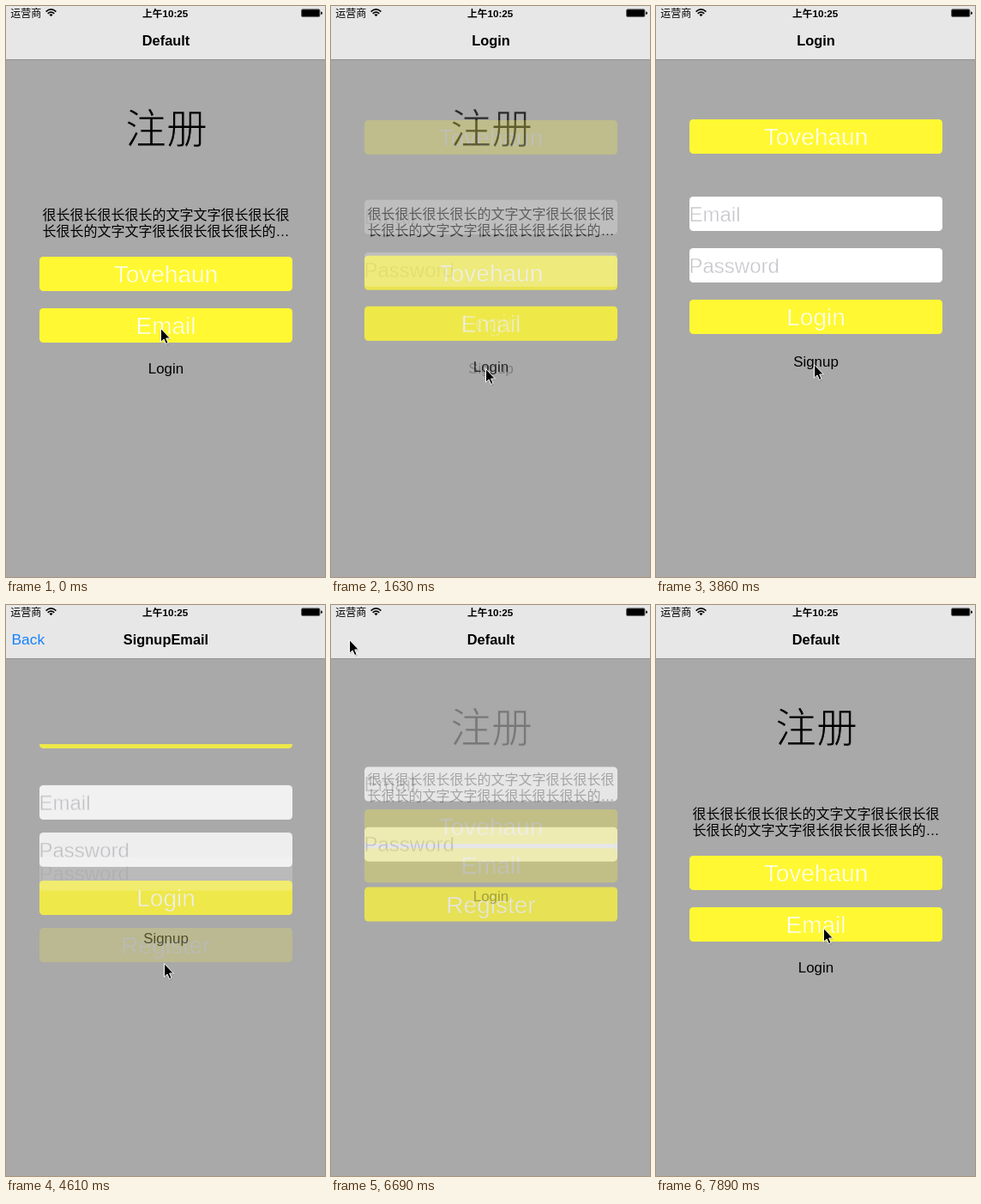
Recreate the animation shown at these times as an HTML page. Size 372 by 665 pixels, loop 8 s.

```html
<!DOCTYPE html>
<html lang="zh-CN">
<head>
<meta charset="utf-8">
<title>Login flow</title>
<style>
  html, body { margin: 0; width: 100%; height: 100%; overflow: hidden; background: #a9a9a9; }
  svg { display: block; width: 100%; height: 100%; }
  text { font-family: "Liberation Sans", "Noto Sans CJK SC", "Noto Sans CJK", sans-serif; }
  .mid { text-anchor: middle; }
  /* Background-coloured strokes thin the letters to a light weight. */
  .headline { font-size: 48px; font-weight: 300; stroke: #a9a9a9; stroke-width: 1.1; }
  .copy { font-size: 16px; font-weight: 300; }
  .link { font-size: 16.9px; }
  .caption { font-size: 28px; fill: #fff; stroke: #fff833; stroke-width: .6; }
  .hint { font-size: 24px; fill: #c7c7cc; stroke: #fff; stroke-width: .4; }
  .navTitle { font-size: 16.4px; font-weight: bold; }
  .back { font-size: 17.4px; fill: #1582fb; }
  .status { font-size: 11.7px; }
</style>
</head>
<body>
<svg viewBox="0 0 372 665" preserveAspectRatio="none">
  <defs>
    <clipPath id="below"><rect y="162" width="372" height="503"/></clipPath>
  </defs>
  <rect width="372" height="665" fill="#a9a9a9"/>
  <g id="stage"></g>
  <rect width="372" height="62" fill="#e7e7e7"/>
  <rect y="62" width="372" height="1" fill="#929292"/>

  <text class="status" x="5.3" y="12.5" style="font-size:12px">运营商</text>
  <g fill="none" stroke="#000" stroke-width="1.6">
    <path d="M46.6 6.6Q52.5 1.2 58.4 6.6M48.7 8.9Q52.5 5.5 56.3 8.9"/>
    <path d="M50.4 10L52.5 12.3L54.6 10Q52.5 8.4 50.4 10Z" fill="#000" stroke="none"/>
  </g>
  <text class="status mid" x="185.7" y="12.5" font-weight="bold">上午10:25</text>
  <rect x="344.5" y="3.8" width="21.5" height="8.8" rx="1.5" fill="#555" stroke="#333" stroke-width=".6"/>
  <rect x="345.2" y="4.5" width="20.1" height="7.4" rx=".6"/>
  <path d="M367.2 6.6Q369 6.8 369 8.3Q369 9.8 367.2 10Z"/>

  <text class="navTitle mid" id="navTitle" x="186.5" y="46"></text>
  <text class="back" id="back" x="6.5" y="46">Back</text>
  <g id="cursor">
    <path d="M1 2V17L5 14L7.5 20L10 19L7.6 13.4H12Z" opacity=".22"/>
    <path d="M.5 .6V16.2L4.1 13L6.6 18.6L9.1 17.5L6.7 12H11.4Z" stroke="#fff" stroke-width="1"/>
  </g>
</svg>
<script>
const $ = id => document.getElementById(id);
const LOOP = 8000, TICK = 148.87;

// Every part is drawn at its resting position; only shifts are animated.
const label = (cls, x, y, s) => `<text class="${cls}" x="${x}" y="${y}">${s}</text>`;
const box = (y, fill) => `<rect x="39" y="${y}" width="295" height="40" rx="4.5" fill="${fill}"/>`;
const button = (y, s) => box(y, '#fff833') + label('caption mid', 186.5, y + 30, s);
const field = (y, s) => box(y, '#fff') + label('hint', 38.5, y + 28.5, s);
const link = (y, s) => label('link mid', 186.5, y, s);

const pages = {
  Default: [
    label('headline mid', 187, 160, '注册'),
    label('copy', 42.5, 249, '很长很长很长很长的文字文字很长很长很') +
      label('copy', 42.5, 268, '长很长的文字文字很长很长很长很长的…'),
    button(292, 'Tovehaun'), button(352, 'Email'), link(428, 'Login')
  ],
  Login: [
    button(132, 'Tovehaun'), field(222, 'Email'), field(282, 'Password'),
    button(342, 'Login'), link(420, 'Signup')
  ],
  SignupEmail: [field(172, 'Email'), field(232, 'Password'), button(292, 'Register')]
};

// leave: where old parts drift to; enter: where new parts come from.
const changes = [
  { at: 11, from: 'Default', to: 'Login', ease: [.25, .9],
    leave: [0, -4, -5, -8, -8], enter: [1.3, 5, 6.7, 9.5, 10.5] },
  { at: 31, from: 'Login', to: 'SignupEmail', ease: [.2, .9], clip: true,
    leave: [-25, -60, -85, -105, -130], enter: [47, 76, 105] },
  { at: 45, from: 'SignupEmail', to: 'Default', ease: [.29, .93],
    leave: [57, 92, 126], enter: [0, -56, -76, -97, -117] }
];

// Pointer stops: tick, x, y
const stops = [
  [0, 180, 375], [5, 179, 384], [6, 178, 402], [7, 179, 417], [8, 180, 422],
  [15, 194, 372], [16, 190, 304], [17, 174, 347], [18, 166, 357], [19, 162, 364], [20, 160, 368],
  [22, 171, 360], [25, 178, 392], [26, 184, 417],
  [33, 158, 320], [34, 110, 160], [35, 84, 69], [37, 63, 62], [38, 36, 48], [39, 21, 40],
  [49, 60, 96], [50, 140, 250], [51, 217, 360], [52, 207, 394], [53, 195, 376]
];

const layers = {};
for (const [name, parts] of Object.entries(pages)) {
  const layer = document.createElementNS('http://www.w3.org/2000/svg', 'g');
  layer.innerHTML = parts.map(p => `<g>${p}</g>`).join('');
  layers[name] = layer;
}

function place(name, opacity, shifts, amount) {
  const layer = layers[name];
  layer.setAttribute('opacity', opacity);
  [...layer.children].forEach((part, i) =>
    part.setAttribute('transform', `translate(0 ${shifts ? shifts[i] * amount : 0})`));
  $('stage').append(layer);
}

function draw(tick) {
  const change = changes.filter(c => c.at <= tick).pop();
  const current = change ? change.to : 'Default';
  const p = change ? change.ease[tick - change.at] ?? 1 : 1;

  $('stage').replaceChildren();
  if (p < 1) place(change.from, 1 - p, change.leave, p);
  place(current, p, change && change.enter, 1 - p);
  if (p < 1 && change.clip) $('stage').setAttribute('clip-path', 'url(#below)');
  else $('stage').removeAttribute('clip-path');

  $('navTitle').textContent = current;
  $('back').setAttribute('opacity', current !== 'SignupEmail' ? 0 : tick >= 43 ? .2 : 1);

  const [, x, y] = stops.filter(s => s[0] <= tick).pop();
  $('cursor').setAttribute('transform', `translate(${x} ${y})`);
}

let shown = -1;
function loop() {
  const tick = Math.floor((performance.now() % LOOP + 13) / TICK);
  if (tick !== shown) draw(shown = tick);
  requestAnimationFrame(loop);
}
loop();
</script>
</body>
</html>
```
